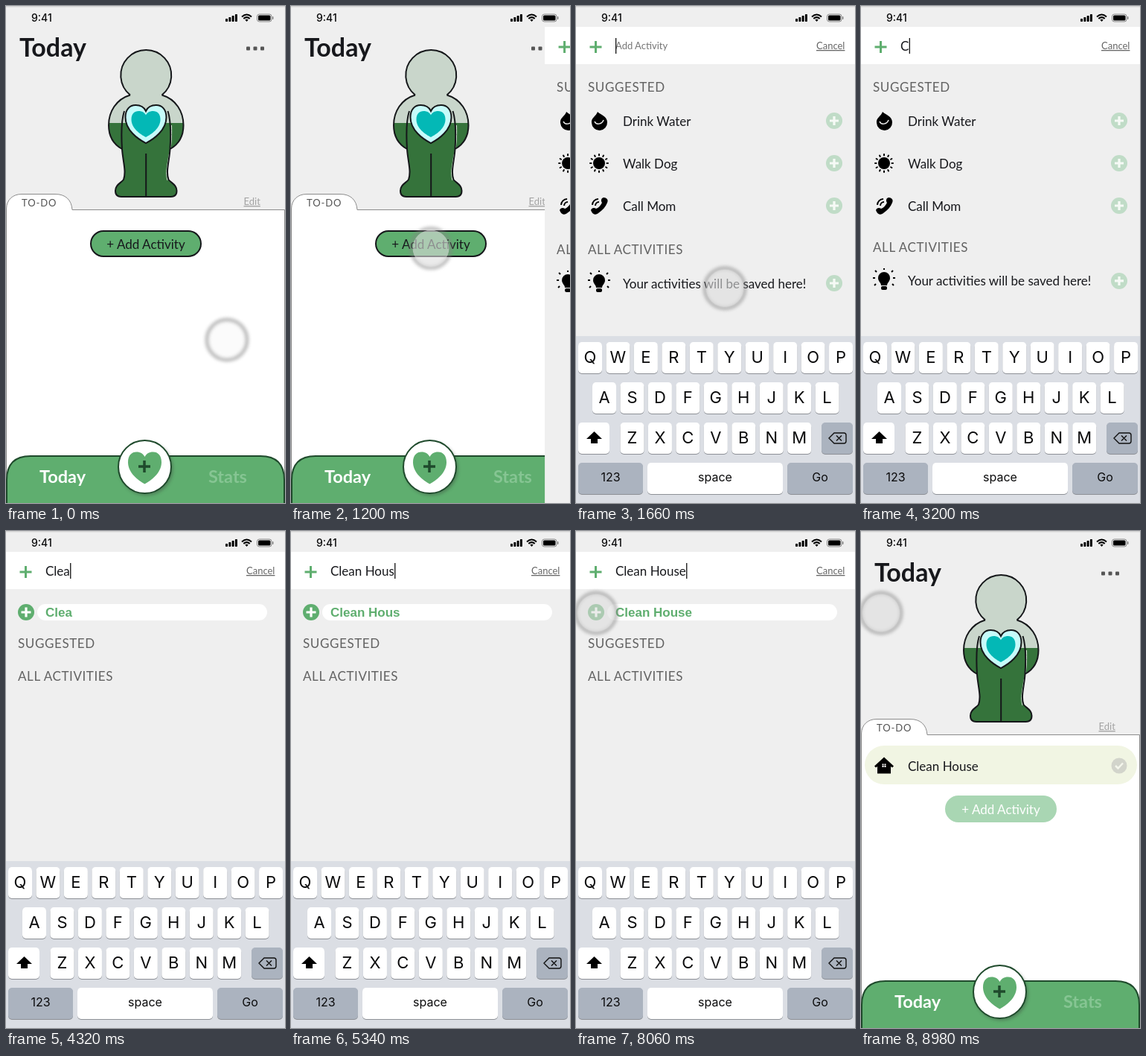
Write an HTML page that moves like this. It is 375 px wide and 667 px high and loops after 9 s.

```html
<!DOCTYPE html>
<html lang="en">
<head>
<meta charset="utf-8">
<title>Add an activity</title>
<style>
  html, body { margin: 0; width: 100%; height: 100%; overflow: hidden; background: #efefef; }
  svg { display: block; width: 100vw; height: 100vh; }
  text { font-family: Lato, sans-serif; font-size: 17px; fill: #17181c; white-space: pre; }
  .ui { font-family: Inter, sans-serif; fill: #0b0b0c; }
  .small { font-size: 13px; text-decoration: underline; }
  .section { fill: #626262; letter-spacing: .6px; }
</style>
</head>
<body>
<svg id="stage" viewBox="0 0 375 667" xmlns="http://www.w3.org/2000/svg"></svg>
<script>
const GREEN = '#5fae6f', DARK = '#1f4a2c', INK = '#15171a', BG = '#efefef';
const LOOP = 9000;

const rect = (x, y, w, h, fill, r = 0, more = '') =>
  `<rect x="${x}" y="${y}" width="${w}" height="${h}" rx="${r}" fill="${fill}" ${more}/>`;
const disc = (x, y, r, fill, more = '') =>
  `<circle cx="${x}" cy="${y}" r="${r}" fill="${fill}" ${more}/>`;
const line = (d, color, w, more = '') =>
  `<path d="${d}" fill="none" stroke="${color}" stroke-width="${w}" ${more}/>`;
const label = (x, y, s, more = '') => `<text x="${x}" y="${y}" ${more}>${s}</text>`;
const plus = (x, y, r, color, w) =>
  line(`M${x - r} ${y}H${x + r}M${x} ${y - r}V${y + r}`, color, w);

// Heart centred at x, y with half-width a and vertical unit b
function heart(x, y, a, b, more) {
  const p = (u, v) => `${x + u * a} ${y + v * b}`;
  return `<path d="M${p(0, 1)}C${p(-.38, .8)} ${p(-1, .35)} ${p(-1, -.3)}
    C${p(-1, -.72)} ${p(-.78, -.92)} ${p(-.5, -.92)}C${p(-.25, -.92)} ${p(-.08, -.8)} ${p(0, -.62)}
    C${p(.08, -.8)} ${p(.25, -.92)} ${p(.5, -.92)}C${p(.78, -.92)} ${p(1, -.72)} ${p(1, -.3)}
    C${p(1, .35)} ${p(.38, .8)} ${p(0, 1)}Z" ${more}/>`;
}

function rays(n, r1, r2, w, from = 0, sweep = 360) {
  let d = '';
  for (let i = 0; i < n; i++) {
    const a = (from + sweep * i / n) * Math.PI / 180, c = Math.cos(a), s = Math.sin(a);
    d += `M${c * r1} ${s * r1}L${c * r2} ${s * r2}`;
  }
  return line(d, '#000', w, 'stroke-linecap="round"');
}

const icons = {
  drop: `<path d="M-2-12C2-8 11-6 11 2A10.5 10.5 0 0 1-10 3C-11-4-4-6-2-12Z"/>`
    + line('M-6 1C-4 6 4 5 6-1', BG, 1.5),
  sun: disc(0, 0, 8, '#000') + rays(12, 10.5, 12, 2),
  phone: `<path d="M-11 6C-9 12-5 13-1 10C5 6 9 1 11-4C13-8 10-11 6-11C3-10 2-7 4-4C2 0-1 3-4 4C-7 2-10 3-11 6Z"/>`
    + line('M-9-1A8 8 0 0 1-1-9M-5 0A5 5 0 0 1 0-5', '#000', 2),
  bulb: `<path d="M-4 6C-4 2-8 1-8-4A8 8 0 0 1 8-4C8 1 4 2 4 6Z"/>` + rect(-4, 7, 8, 5, '#000', 2)
    + line('M0-15V-17M-10-12L-12-14M10-12L12-14M-12-4H-15M12-4H15M-11 4L-13 6M11 4L13 6', '#000', 2),
  house: `<path d="M0-11L13 1L11 3L9 1.500V11H-9V1.500L-11 3L-13 1Z"/>`
    + rect(-2.500, -2, 2, 2, '#fff') + rect(.5, -2, 2, 2, '#fff')
    + rect(-2.500, .5, 2, 2, '#fff') + rect(.5, .5, 2, 2, '#fff')
};
const icon = (name, x, y) => `<g transform="translate(${x} ${y})">${icons[name]}</g>`;

const row = (id, y, name, text) => `<g id="${id}">${icon(name, 31, y)}
  ${label(63, y + 6.5, text)}${disc(347, y, 11, '#c0dcc7')}${plus(347, y, 6, '#f6faf6', 3.200)}</g>`;

function figure() {
  const arm = `M166.500 119C148 125 138 142 138 160C138 177 147 187 156 192`;
  const half = `${arm}C157 208 162 222 158 233C154 238 147 240 147 248Q147 256 155 256H188.500V119Z`;
  const head = disc(188.200, 93, 34, 'currentColor');
  const flip = s => s + `<g transform="translate(376.500 0) scale(-1 1)">${s}</g>`;
  const edges = line(`M167 119.500C148 125 138 142 138 160C138 177 147 187 156 192
    C157 208 162 222 158 233C154 238 147 240 147 248Q147 256 155 256H189M159 141C154 156 155 176 156 192`, INK, 2);
  const solid = head + flip(`<path d="${half}" fill="currentColor"/>`);
  return `<g color="#c9d6cb">${solid}</g><g color="#35733b" clip-path="url(#level)">${solid}</g>
    ${line('M222.500 160C223 178 222 190 219 200C217 214 214 224 217 234', '#dfeade', 1)}
    ${flip(edges)}${line('M167 119.500A34 34 0 1 1 209.500 119.500', INK, 2)}${line('M188.200 198V256', INK, 2)}
    ${heart(188, 157.500, 27.500, 26.600, `fill="#c6fbfa" stroke="${INK}" stroke-width="2"`)}
    ${heart(188, 157.700, 19.500, 18.200, 'fill="#03b8b6"')}`;
}

function home() {
  return rect(0, 0, 375, 667, BG)
    + label(18, 67.500, 'Today', 'style="font-size:34px;font-weight:700"')
    + [323, 332.500, 342].map(x => rect(x, 54.500, 5, 5, '#555', 1)).join('')
    + figure()
    + label(319.500, 267, 'Edit', 'class="small" style="fill:#a3a3a3"')
    + `<path d="M.5 670V272C1 260 9 252.500 21 252.500H66C80 252.500 88 260 89 273.500H374.500V670"
        fill="#fff" stroke="#8c8c8c"/>`
    + label(21, 269, 'TO-DO', 'style="font-size:13px;letter-spacing:.9px;fill:#555"')
    + `<g id="task">${rect(5, 288, 366, 52, '#f1f5e3', 26)}${icon('house', 31, 314.500)}
        ${label(63, 321.500, 'Clean House')}${disc(347, 315, 10.500, '#d2d4cb')}
        ${line('M342 315L345.500 318.500L352 311.500', '#f4f6ec', 2.500)}</g>`
    + `<g id="add">${rect(114, 302, 148, 34, GREEN, 17, `id="addBox" stroke="${INK}" stroke-width="2"`)}
        ${label(188, 326, '+ Add Activity', 'id="addText" text-anchor="middle"')}</g>`
    + `<path d="M1 670V636Q1 604 33 604H342Q374 604 374 636V670Z" fill="${GREEN}" stroke="${DARK}" stroke-width="2"/>`
    + label(45, 639.500, 'Today', 'style="font-size:23.500px;font-weight:700;fill:#fff"')
    + label(272, 639.500, 'Stats', 'style="font-size:23.500px;font-weight:700;fill:#86c593"')
    + disc(188.500, 621, 36, '#3a4a3e', 'opacity=".45" filter="url(#soft)"')
    + disc(186.500, 618.500, 35.500, '#fff', `stroke="${DARK}" stroke-width="2"`)
    + heart(186.500, 619, 22.500, 22.400, `fill="${GREEN}"`) + plus(186, 618, 8, DARK, 3.500);
}

function keyboard() {
  const key = (x, y, w, fill = '#fff') =>
    rect(x, y + 1, w, 42, '#8d9096', 5) + rect(x, y, w, 42, fill, 5);
  const word = (x, s) => label(x, 637.500, s, 'class="ui" text-anchor="middle" style="font-size:16px"');
  const gray = '#abb3bf';
  let s = rect(0, 443, 375, 224, '#dbdee4');
  ['QWERTYUIOP', 'ASDFGHJKL', 'ZXCVBNM'].forEach((letters, r) => {
    const y = 451 + r * 54, x0 = [3, 22, 59.500][r];
    [...letters].forEach((c, i) => {
      const x = x0 + i * 37.450;
      s += key(x, y, 32) + label(x + 16, y + 27.500, c, 'class="ui" text-anchor="middle" style="font-size:22px"');
    });
  });
  return s + key(3, 559, 42) + '<path d="M24.500 571L35 581H29V587H20V581H14Z"/>'
    + key(330, 559, 42, gray)
    + line('M340 580L347 573H360Q363 573 363 576V584Q363 587 360 587H347ZM350 576.500L357 583.500M357 576.500L350 583.500', '#111', 1.400)
    + key(3, 613, 87, gray) + word(46.500, '123')
    + key(96, 613, 182) + word(187, 'space')
    + key(284, 613, 88, gray) + word(328, 'Go');
}

function panel() {
  return rect(0, 28, 375, 639, BG) + rect(0, 28, 375, 50, '#fff')
    + plus(26.500, 55, 8, GREEN, 3)
    + label(53, 58, 'Add Activity', 'id="hint" style="font-size:13px;fill:#757575"')
    + label(53, 60, '', 'id="typed"') + rect(53, 43, 1.300, 21, '#111', 0, 'id="caret"')
    + label(323, 58, 'Cancel', 'class="small" style="fill:#666"')
    + `<g id="chip">${rect(42, 98, 309, 22, '#fff', 11)}${disc(27, 109, 11, GREEN)}${plus(27, 109, 6.500, '#fff', 3.200)}
        ${label(53, 115, '', `id="chipText" style="font-family:'Liberation Sans',Arial,sans-serif;font-weight:700;fill:${GREEN}"`)}</g>`
    + row('water', 154, 'drop', 'Drink Water') + row('walk', 211, 'sun', 'Walk Dog')
    + row('call', 268, 'phone', 'Call Mom') + row('saved', 372, 'bulb', 'Your activities will be saved here!')
    + label(16, 115, 'SUGGESTED', 'id="suggested" class="section"')
    + label(16, 333, 'ALL ACTIVITIES', 'id="all" class="section"')
    + `<g id="keys">${keyboard()}</g>`;
}

function statusBar() {
  const bars = [0, 1, 2, 3].map(i => rect(295 + i * 4.300, 17 - i * 2, 3, 4 + i * 2, '#000', .8)).join('');
  return rect(0, 0, 375, 28, BG) + rect(0, 0, 375, 1.500, '#d3d3d3')
    + label(34, 21, '9:41', 'class="ui" style="font-size:14px;font-weight:500"') + bars
    + line('M317 14.500Q323.500 8.500 330 14.500M319.300 17Q323.500 13.200 327.700 17', '#000', 2)
    + '<path d="M321.300 18.500Q323.500 16.800 325.700 18.500L323.500 21Z"/>'
    + rect(337.500, 11, 19.500, 10, 'none', 3, 'stroke="#888"')
    + rect(339, 12.500, 16.500, 7, '#000', 1.500) + rect(358, 14, 1.500, 4, '#888', .7);
}

const stage = document.getElementById('stage');
stage.innerHTML = `<defs>
    <clipPath id="level"><rect y="157" width="375" height="110"/></clipPath>
    <filter id="soft" x="-30%" y="-30%" width="160%" height="160%"><feGaussianBlur stdDeviation="2"/></filter>
  </defs>${home()}<g id="panel">${panel()}</g>${statusBar()}
  <g id="touch">${line('M-27 0A27 27 0 1 1 27 0A27 27 0 1 1-27 0', '#858585', 5, 'opacity=".55" filter="url(#soft)"')}
    ${disc(0, 0, 25, '#dedede', 'id="pad"')}</g>`;

const el = {};
stage.querySelectorAll('[id]').forEach(n => el[n.id] = n);

const step = (t, a, b) => Math.min(1, Math.max(0, (t - a) / (b - a)));
const ease = (t, a, b) => { const k = step(t, a, b); return k * k * (3 - 2 * k); };
const mix = (a, b, k) => a + (b - a) * k;
const move = (n, x, y) => n.setAttribute('transform', `translate(${x} ${y})`);
const fade = (n, o) => n.setAttribute('opacity', o);

const WORD = 'Clean House';
const KEY_TIMES = [3100, 3780, 4050, 4300, 4540, 4680, 4840, 5000, 5150, 5300, 5570];

// Touch path: time, x, y
const PATH = [
  [0, 297, 448], [920, 188, 325], [1300, 188, 325], [2020, 212, 432],
  [6300, 300, 302], [7000, 27, 110], [LOOP, 27, 110]
];

function drawTouch(t) {
  const i = Math.max(1, PATH.findIndex(p => t < p[0]));
  const [a, b] = [PATH[i - 1], PATH[i]];
  let k = ease(t, a[0], b[0]);
  if (t > 2020 && t < 6300) k = 1;
  const press = ease(t, 950, 1070) - ease(t, 1130, 1260) + ease(t, 7020, 7160) - ease(t, 7250, 7420);
  el.touch.setAttribute('transform',
    `translate(${mix(a[1], b[1], k)} ${mix(a[2], b[2], k)}) scale(${1 - .05 * press})`);
  fade(el.touch, 1 - ease(t, 1760, 2100) + ease(t, 6040, 6260));
  fade(el.pad, mix(.12, .6, ease(t, 150, 850)));
}

function drawField(t) {
  const count = KEY_TIMES.filter(k => t >= k).length;
  const text = WORD.slice(0, count);
  if (el.typed.textContent !== text) el.typed.textContent = el.chipText.textContent = text;
  fade(el.hint, count ? 0 : 1);
  el.caret.setAttribute('x', count ? 53 + el.typed.getComputedTextLength() + .3 : 53);
  let on = true;
  if (t < 3100) on = Math.floor((t - 1500) / 600) % 2 === 0;
  else if (t >= 6080) on = Math.floor((t - 6080) / 600) % 2 === 1 || t > 7880;
  fade(el.caret, on ? 1 : 0);
}

function drawList(t) {
  const rise = ease(t, 3140, 3640), open = ease(t, 3220, 3660), shut = ease(t, 3800, 4240);
  const gone = 1 - ease(t, 3210, 3450);
  move(el.suggested, 0, 42 * open);
  move(el.all, 0, -75 * rise - 57 * shut);
  move(el.saved, 0, -75 * rise);
  move(el.call, 0, -71 * open);
  move(el.water, 0, 20 * open);
  move(el.walk, 0, -20 * open);
  [el.water, el.walk, el.saved].forEach(n => fade(n, gone));
  fade(el.call, 1 - ease(t, 3800, 4060));
  fade(el.chip, ease(t, 3380, 3660));
}

function draw(t) {
  const shown = ease(t, 1112, 1592) - ease(t, 8150, 8680);
  move(el.panel, 375 * (1 - shown), 0);
  el.panel.style.display = shown > 0 ? '' : 'none';
  move(el.keys, 0, 224 * (1 - ease(t, 1290, 1640)));

  const done = t > 7500;
  el.task.style.display = done ? '' : 'none';
  move(el.add, 0, done ? 54 : 0);
  el.addBox.setAttribute('fill', done ? '#a9d6b3' : GREEN);
  el.addBox.setAttribute('stroke', done ? '#a9d6b3' : INK);
  el.addText.style.fill = done ? '#fff' : '';

  drawField(t);
  drawList(t);
  drawTouch(t);
}

const start = performance.now();
function tick() {
  draw((performance.now() - start) % LOOP);
  requestAnimationFrame(tick);
}
tick();
</script>
</body>
</html>
```
